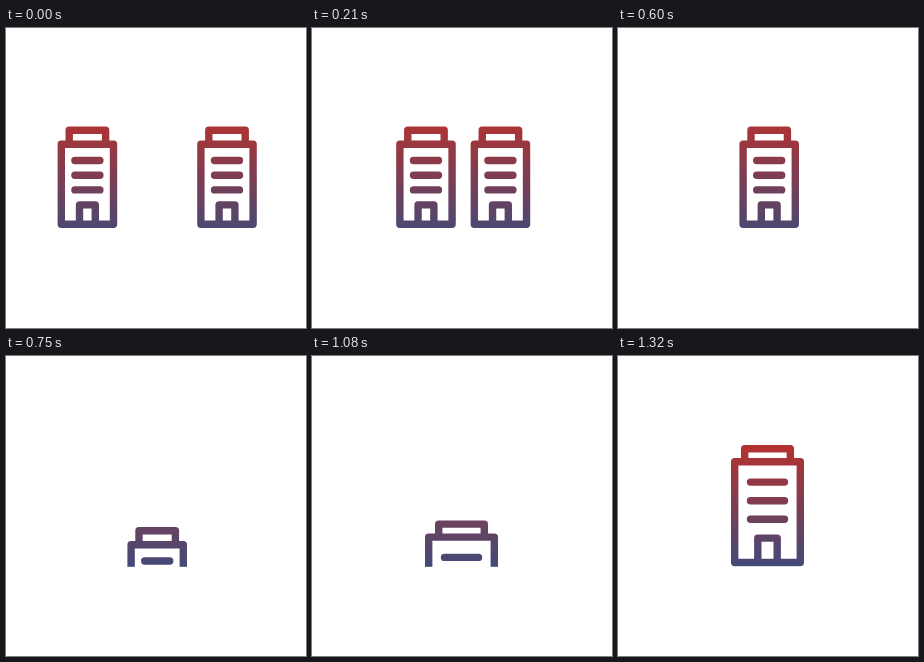
Recreate the animation shown at these times as an HTML page. Size 300x300 px, loop 2700 ms.

```html
<!DOCTYPE html>
<html lang="en">
<head>
<meta charset="utf-8">
<title>Merging buildings</title>
<style>
  html, body { margin: 0; width: 100%; height: 100%; overflow: hidden; background: #fff; }
  svg { display: block; width: 100vw; height: 100vh; }
  #shape { fill: none; stroke: #fff; stroke-width: 7.4; stroke-linecap: round; stroke-linejoin: round; }
</style>
</head>
<body>
<svg viewBox="0 0 300 300">
  <defs>
    <linearGradient id="tint" gradientUnits="userSpaceOnUse" x1="0" y1="89" x2="0" y2="211">
      <stop offset="0" stop-color="#b5322f"/>
      <stop offset="1" stop-color="#424a78"/>
    </linearGradient>
    <mask id="cut" maskUnits="userSpaceOnUse" x="0" y="0" width="300" height="300">
      <g id="shape">
        <path id="left"/>
        <path id="right"/>
        <path id="big"/>
      </g>
    </mask>
  </defs>
  <!-- The colour stays fixed on the stage while the outlines move through it. -->
  <rect width="300" height="210.8" fill="url(#tint)" mask="url(#cut)"/>
</svg>
<script>
  const LOOP = 2700, STEP = 30;
  const MERGE_END = 450, FALL = [600, 840], RISE = [930, 1320];
  const MID_SMALL = 151.2, MID_BIG = 149.5;
  const SPREAD = 69.8, FALL_DIST = 116, RISE_DIST = 122.4;

  const el = id => document.getElementById(id);
  const part = (t, a, b) => Math.min(1, Math.max(0, (t - a) / (b - a)));

  // Half widths and heights of the centre lines, around x = 0
  function building({ cap, capTop, body, top, base, bar, bars, door, doorTop }) {
    return `M${-cap} ${top}V${capTop}H${cap}V${top}` +
      `M${-body} ${top}H${body}V${base}H${-body}Z` +
      bars.map(y => `M${-bar} ${y}H${bar}`).join('') +
      `M${-door} ${base}V${doorTop}H${door}V${base}`;
  }

  const small = building({
    cap: 18.2, capTop: 102.2, body: 26.1, top: 116.3, base: 196.2,
    bar: 12.5, bars: [132.5, 147.2, 161.9], door: 7.9, doorTop: 176.9
  });
  const large = building({
    cap: 22.8, capTop: 92.8, body: 32.8, top: 105.8, base: 206.5,
    bar: 17, bars: [126.1, 144.7, 163.3], door: 9.7, doorTop: 182.1
  });

  const left = el('left'), right = el('right'), big = el('big');
  left.setAttribute('d', small);
  right.setAttribute('d', small);
  big.setAttribute('d', large);

  function place(node, x, y, shown) {
    node.setAttribute('transform', `translate(${x} ${y})`);
    node.setAttribute('visibility', shown ? 'visible' : 'hidden');
  }

  function draw(t) {
    const gap = SPREAD * (1 - part(t, 0, MERGE_END));
    const drop = FALL_DIST * part(t, ...FALL);
    const sink = RISE_DIST * (1 - part(t, ...RISE));
    place(left, MID_SMALL - gap, drop, t < FALL[1]);
    place(right, MID_SMALL + gap, 0, t < FALL[0]);
    place(big, MID_BIG, sink, t > RISE[0]);
  }

  const start = performance.now();
  function tick() {
    const t = (performance.now() - start) % LOOP;
    draw(Math.floor(t / STEP) * STEP);
    requestAnimationFrame(tick);
  }
  draw(0);
  requestAnimationFrame(tick);
</script>
</body>
</html>
```
